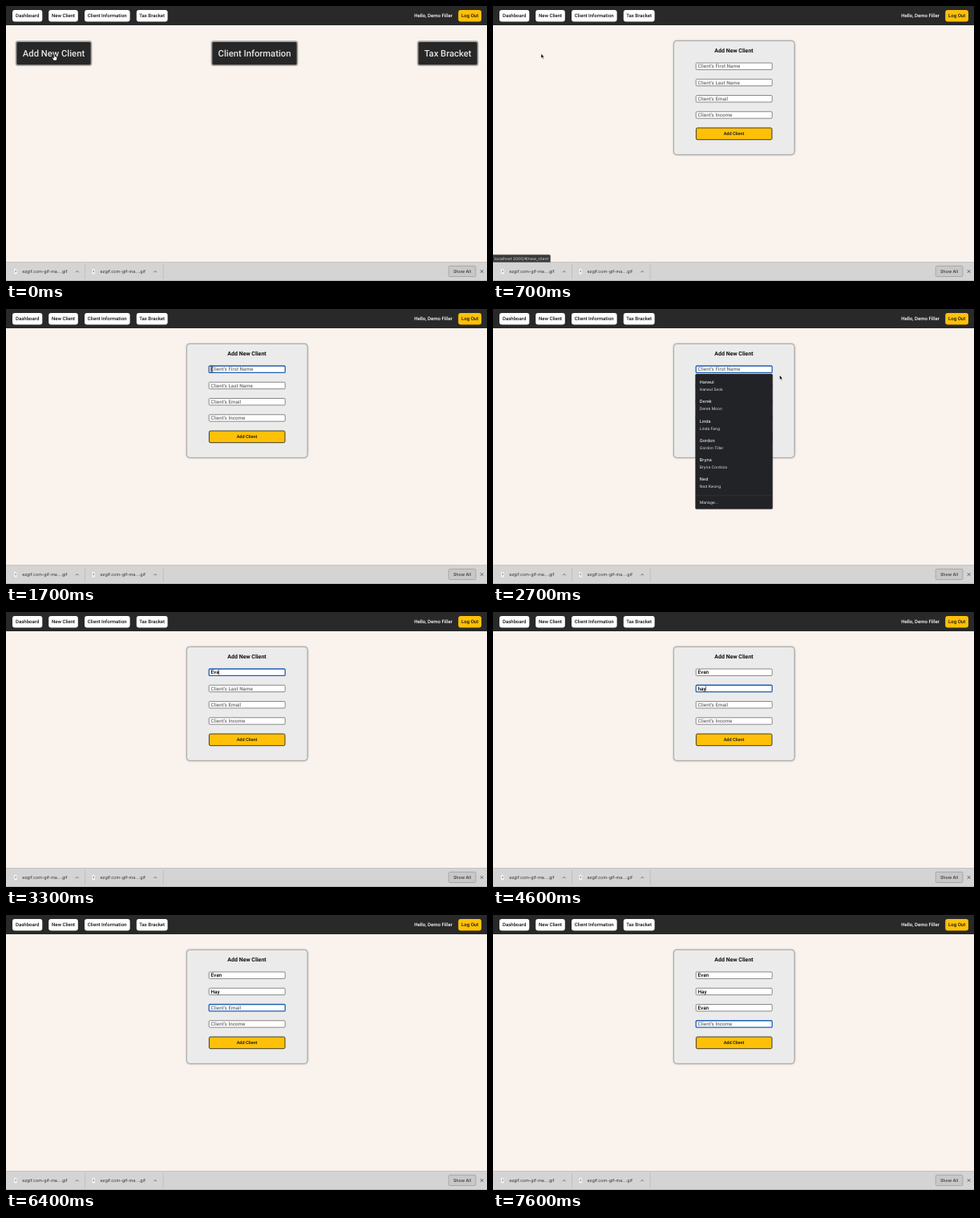
Animation, 600 px wide and 343 px high, one loop 8 s. Source, as an HTML page:

```html
<!DOCTYPE html>
<html lang="en">
<head>
<meta charset="utf-8">
<title>Add New Client</title>
<style>
  html, body { margin: 0; width: 100%; height: 100%; overflow: hidden; background: #faf2ec; }
  svg { display: block; width: 100%; height: 100%; }
  text { font: 500 6px Roboto, sans-serif; text-rendering: geometricPrecision; white-space: pre; }
  .ui text { font-family: Inter, sans-serif; }
  #card { filter: drop-shadow(0 .5px 1px #0005); }
</style>
</head>
<body>
<svg id="stage" viewBox="0 0 600 343"></svg>
<script>
const LOOP = 8000;
const YELLOW = '#ffc107';
const stage = document.getElementById('stage');

function add(parent, tag, attrs = {}, content) {
  const node = document.createElementNS('http://www.w3.org/2000/svg', tag);
  for (const key in attrs) node.setAttribute(key, attrs[key]);
  if (content !== undefined) node.textContent = content;
  return parent.appendChild(node);
}
const group = (parent, attrs) => add(parent, 'g', attrs);
const box = (parent, x, y, width, height, fill, rx = 0, extra = {}) =>
  add(parent, 'rect', { x, y, width, height, fill, rx, ...extra });
const path = (parent, d, attrs) => add(parent, 'path', { d, fill: 'none', ...attrs });
const label = (parent, x, y, size, fill, content, { weight = 500, anchor = 'start' } = {}) =>
  add(parent, 'text', {
    x, y, fill, 'text-anchor': anchor, style: `font-size:${size}px;font-weight:${weight}`
  }, content);
const centered = { anchor: 'middle' };
const show = (node, visible) => node.setAttribute('display', visible ? 'inline' : 'none');

function drawHeader() {
  const bar = group(stage);
  box(bar, 0, 0, 600, 24, '#292929');
  const button = (x, width, name, fill) => {
    box(bar, x, 5, width, 14.6, fill, 3);
    label(bar, x + width / 2, 14.4, 6.05, '#111', name, centered);
  };
  button(8, 37.3, 'Dashboard', '#fff');
  button(53.2, 36.6, 'New Client', '#fff');
  button(98, 56.6, 'Client Information', '#fff');
  button(162.8, 38.8, 'Tax Bracket', '#fff');
  button(564.2, 28.8, 'Log Out', YELLOW);
  label(bar, 533, 14.4, 6.05, '#fff', 'Hello, Demo Filler', centered);
}

function drawDashboard() {
  const page = group(stage);
  const button = (x, width, name) => {
    box(page, x, 44.2, width, 29.8, '#272727', 2.5, { stroke: '#a3a3a3', 'stroke-width': 1.7 });
    label(page, x + width / 2, 63.2, 11.25, '#e4e4e4', name, centered);
  };
  button(12.5, 94, 'Add New Client');
  button(256.5, 107, 'Client Information');
  button(513.6, 75, 'Tax Bracket');
  return page;
}

const fieldTop = i => 71 + 20.25 * i;

function drawForm() {
  const page = group(stage);
  box(page, 225.4, 43.4, 150.6, 142, '#ebebeb', 4, { id: 'card', stroke: '#999', 'stroke-width': .8 });
  label(page, 300.5, 57.7, 7, '#111', 'Add New Client', { ...centered, weight: 600 });
  const fields = ['First Name', 'Last Name', 'Email', 'Income'].map((name, i) => {
    const y = fieldTop(i);
    return {
      frame: box(page, 253.2, y, 95, 8.4, '#fff', 1.2),
      hint: label(page, 255.5, y + 6.4, 6.3, '#6f6f6f', `Client's ${name}`),
      value: label(page, 255.5, y + 6.4, 6.4, '#000', '')
    };
  });
  box(page, 253.4, 152, 94.6, 14.7, YELLOW, 1.7, { stroke: '#222', 'stroke-width': .85 });
  label(page, 300.5, 161.4, 5.55, '#111', 'Add Client', centered);
  const caret = box(page, 0, 0, .5, 6.6, '#000');
  return { page, fields, caret };
}

function drawSuggestions() {
  const list = group(stage, { class: 'ui' });
  box(list, 252.5, 81, 96.3, 168.6, '#222326', 1.5, { stroke: '#3c3c3e', 'stroke-width': .4 });
  const people = ['Haneul Seok', 'Derek Moon', 'Linda Fang', 'Gordon Tiller', 'Bryna Cordoza', 'Ned Kwong'];
  people.forEach((name, i) => {
    const y = 93.2 + 24.25 * i;
    label(list, 257.8, y, 5.3, '#f2f2f2', name.split(' ')[0]);
    label(list, 257.8, y + 9, 4.85, '#e2e2e2', name, { weight: 400 });
  });
  box(list, 252.8, 232.6, 95.7, .5, '#3b3c3f');
  label(list, 257.8, 243, 5, '#e8e8e8', 'Manage...', { weight: 400 });
  return list;
}

function drawDownloads() {
  const bar = group(stage, { class: 'ui' });
  box(bar, 0, 319.3, 600, 23.7, '#d4d4d4');
  box(bar, 0, 319, 600, .6, '#b4b4b4');
  box(bar, 0, 342.2, 600, .8, '#b0b0b0');
  [0, 97.4].forEach(x => {
    const item = group(bar, { transform: `translate(${x} 0)` });
    path(item, 'M9.6 327.6h2.8l1.6 1.6v5.6H9.6z', { fill: '#f4f4f4', stroke: '#c2c2c2', 'stroke-width': .4 });
    label(item, 11.8, 333.3, 4.4, '#555', '?', centered);
    label(item, 20.2, 333.2, 5.35, '#333', 'ezgif.com-gif-ma....gif', { weight: 400 });
    path(item, 'M87 332.2l1.8-1.8 1.8 1.8', { stroke: '#555', 'stroke-width': .8 });
    box(item, 98.4, 322, .6, 18.5, '#b5b5b5');
  });
  box(bar, 552.2, 324.3, 33.8, 13.2, '#c8c8c8', 1.5, { stroke: '#999', 'stroke-width': .7 });
  label(bar, 569, 332.8, 5.35, '#333', 'Show All', centered);
  path(bar, 'M591.8 329.2l3.6 3.6m0-3.6l-3.6 3.6', { stroke: '#444', 'stroke-width': .8 });
}

function drawStatus() {
  const status = group(stage, { class: 'ui' });
  path(status, 'M0 310.2h70q1.6 0 1.6 1.6v7.6H0z', { fill: '#38383a', stroke: '#666', 'stroke-width': .4 });
  label(status, 2, 316.7, 5, '#d8d8d8', 'localhost:3000/#/new_client', { weight: 400 });
  return status;
}

// Each pointer is drawn around its hot spot.
function drawPointers() {
  const outline = { 'stroke-linejoin': 'round', 'stroke-width': .6 };
  return {
    arrow: path(stage, 'M0 0v5.9l1.4-1.3 1 2.3 1-.45-1-2.2h1.9z', { ...outline, fill: '#000', stroke: '#fff' }),
    hand: path(stage, 'M-.7 .6q.7-1 1.3 0v2.2l2.3.6q.7.2.6 1l-.4 2.6-.6 1H-.9L-2.6 5q-.4-1 .5-.9l1.4.9z',
      { ...outline, fill: '#fff', stroke: '#000' }),
    beam: path(stage, 'M-1.4-3.8q1.4 0 1.4.8v6q0 .8-1.4.8M1.4-3.8q-1.4 0-1.4.8v6q0 .8 1.4.8',
      { stroke: '#222', 'stroke-width': .6 })
  };
}

drawHeader();
const dashboard = drawDashboard();
const form = drawForm();
const suggestions = drawSuggestions();
drawDownloads();
const status = drawStatus();
const pointers = drawPointers();

// [time, field, text]: every focus change and keystroke
const edits = [
  [1600, 0, ''], [1800, 0, ''],
  [3100, 0, 'E'], [3200, 0, 'Ev'], [3300, 0, 'Eva'], [3500, 0, 'Evan'],
  [3700, 1, ''], [4100, 1, 'h'], [4500, 1, 'ha'], [4600, 1, 'hay'],
  [5000, 1, 'ha'], [5100, 1, 'h'], [5200, 1, ''],
  [5500, 1, 'H'], [5600, 1, 'Ha'], [5700, 1, 'Hay'],
  [5900, 2, ''], [6500, 2, 'E'], [6700, 2, 'Eva'], [6900, 2, 'Evan'],
  [7100, 3, '']
];

// [time, x, y]
const route = [
  [0, 60.3, 60], [100, 60.3, 59.5], [800, 59.9, 59.4], [1400, 257, 75],
  [1800, 257, 75], [2400, 357.4, 82.4], [LOOP, 357.4, 82.4]
];

function pointerAt(t) {
  const i = route.findIndex(stop => stop[0] > t);
  const [t0, x0, y0] = route[i - 1], [t1, x1, y1] = route[i];
  const k = (t - t0) / (t1 - t0), eased = k * k * (3 - 2 * k);
  return [x0 + (x1 - x0) * eased, y0 + (y1 - y0) * eased];
}

function renderPointer(t) {
  const [x, y] = pointerAt(t);
  const overField = x > 253 && x < 348 && y > 71 && y < 79.5;
  const kind = t >= 2800 ? null : t < 600 ? 'hand' : overField ? 'beam' : 'arrow';
  for (const name in pointers) {
    show(pointers[name], name === kind);
    pointers[name].setAttribute('transform', `translate(${x} ${y})`);
  }
}

function renderFields(t) {
  const past = edits.filter(edit => edit[0] <= t);
  const last = past[past.length - 1];
  form.fields.forEach((field, i) => {
    const text = past.reduce((value, edit) => edit[1] === i ? edit[2] : value, '');
    const focused = last && last[1] === i;
    field.value.textContent = text;
    show(field.hint, !text);
    field.frame.setAttribute('stroke', focused ? '#1f5fb5' : '#6c6c6c');
    field.frame.setAttribute('stroke-width', focused ? 1.3 : .8);
  });
  const caretOn = last && (t - last[0]) % 1000 < 500;
  show(form.caret, caretOn);
  if (!caretOn) return;
  const [, index, text] = last;
  const width = text ? form.fields[index].value.getComputedTextLength() : 0;
  form.caret.setAttribute('x', 255.4 + width);
  form.caret.setAttribute('y', fieldTop(index) + .9);
}

function render(t) {
  show(dashboard, t < 600);
  show(form.page, t >= 600);
  show(status, t >= 300 && t < 1000);
  show(suggestions, t >= 1800 && t < 2800);
  renderFields(t);
  renderPointer(t);
}

const start = performance.now();
function tick() {
  const t = (performance.now() - start) % LOOP;
  render(Math.floor(t / 100) * 100);
  requestAnimationFrame(tick);
}
tick();
</script>
</body>
</html>
```
